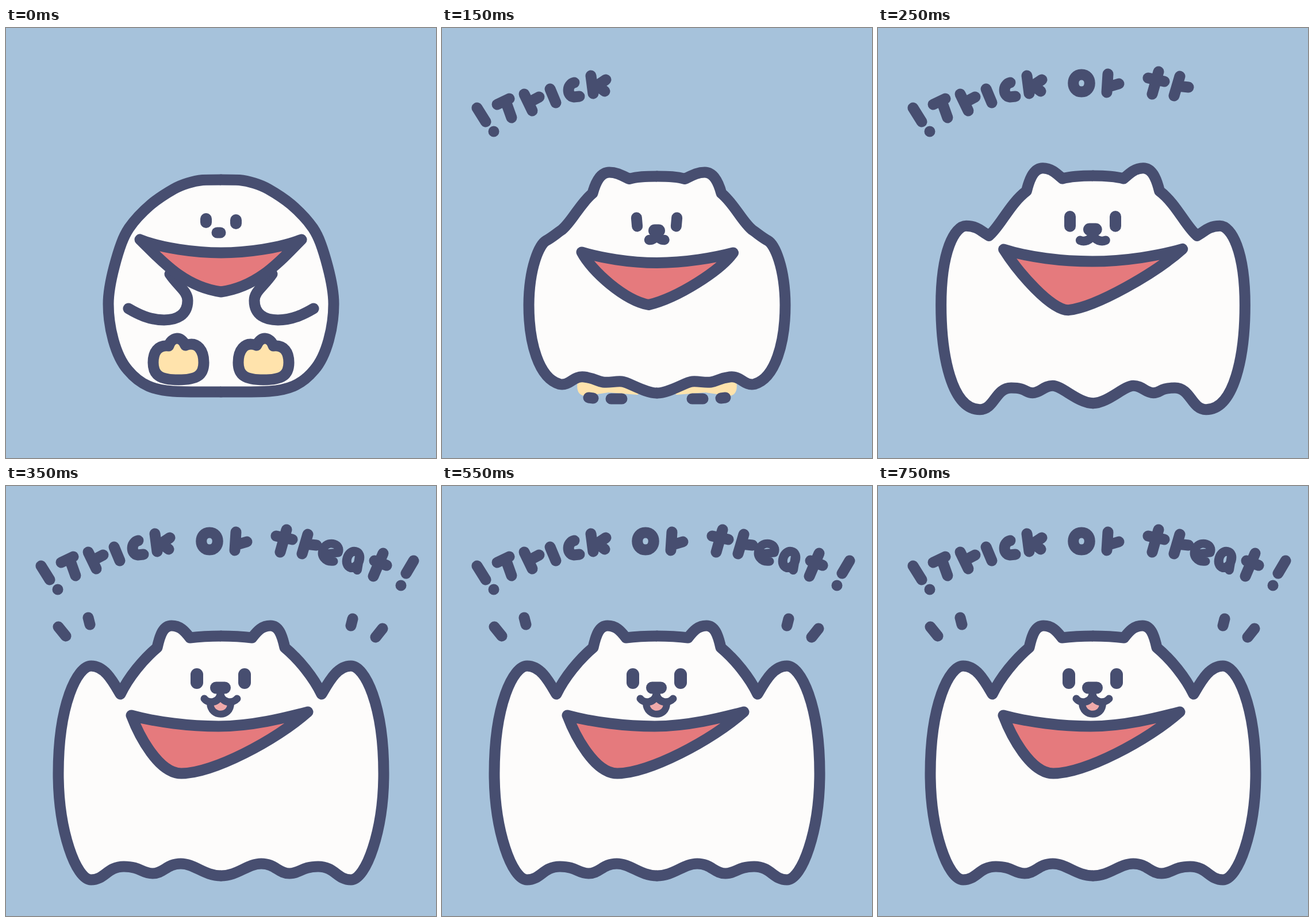
Recreate the animation shown at these times as an HTML page. Size 748 by 748 pixels, loop 0.85 s.

```html
<!DOCTYPE html>
<html lang="en">
<head>
<meta charset="utf-8">
<title>Trick or treat</title>
<style>
html, body { margin: 0; width: 100%; height: 100%; overflow: hidden; background: #a6c2db; }
svg { display: block; width: 748px; height: 748px; }
.ink { stroke: #474e70; stroke-width: 19; stroke-linecap: round; stroke-linejoin: round; fill: none; }
.solid { fill: #474e70; }
.white { fill: #fdfcfb; }
.red { fill: #e57a7d; }
.foot { fill: #ffe3ac; }
</style>
</head>
<body>
<svg viewBox="0 0 748 748">
  <g id="backFeet">
    <g id="backFoot">
      <path class="foot" d="M236 615Q232 638 248 640L290 634L340 638Q346 634 343 628L300 600Z"/>
      <path class="ink" d="M255 643L263 644M294 645L313 645"/>
    </g>
    <use href="#backFoot" transform="matrix(-1 0 0 1 748 0)"/>
  </g>
  <g>
    <path id="body" class="ink white"/>
    <use href="#body" transform="matrix(-1 0 0 1 748 0)"/>
  </g>
  <g id="limbs">
    <g id="limb">
      <path id="arm" class="ink"/>
      <path id="foot" class="ink foot"/>
    </g>
    <use href="#limb" transform="matrix(-1 0 0 1 748 0)"/>
  </g>
  <path id="mouth" class="ink red"/>
  <path id="chin" class="ink" style="fill:#f0a9a9;stroke-width:12"/>
  <path id="lip" class="ink"/>
  <rect id="nose" class="solid"/>
  <rect id="eyeL" class="solid"/>
  <rect id="eyeR" class="solid"/>
  <g id="text" class="ink"></g>
  <path id="marks" class="ink" d="M91 245L104 261M143 229L146 241M603 231L600 243M655 248L643 263"/>
</svg>
<script>
const $ = id => document.getElementById(id);

// body: left half outline; eyes: lx ly rx ry w h tilt; nose: cx cy w h
const round = {
  body: 'M374 264C362 264 352 264 342 264.5C326 266 306 272 292 280S264 297 252 307C238 319 223 335 214 348C208 357 204 366 201 374S178 440 178 480C178 520 190 570 212 595C222 607 234 617 248 623S275 631 290 632S320 633 335 633S360 633 374 633',
  mouth: 'M233 368C270 383 330 391 374 391C418 391 477 383 514 368C480 402 440 450 374 459C308 450 268 402 233 368Z',
  lip: 'M366 357C367 357 369 356 370 356C371 355 373 355 374 355', lipWidth: '15',
  eyes: '348 335 400 337 20 26 0', nose: '370 356 25 19',
  arm: 'M285 428C300 450 316 458 316 474C316 500 296 508 275 508C250 508 230 498 213 488',
  foot: 'M300 612C268 612 256 604 256 582C256 564 264 551 283 553C288 538 304 534 312 552C334 544 344 562 344 582C344 604 332 612 300 612Z'
};
const eared = {
  body: 'M374 261C356 261 344 261 330 264C318 261 308 258 296 258S274 269 268 290C254 305 240 322 227 341C217 355 211 367 206 380S184 440 183 490C183 540 205 565 217 586C228 593 238 601 250 606S272 614 284 617S310 623 322 625S355 630 374 630',
  mouth: 'M267 402C290 406 330 417 374 417C418 417 458 406 481 402C478 426 432 460 374 477C316 460 270 426 267 402Z',
  lip: 'M366 368C368 369 372 366 373 360C374 366 378 369 381 368', lipWidth: '18',
  eyes: '343 338 404 338 19 31 10', nose: '373.5 355 27 22',
  arm: 'M270 405C271 430 270 455 264 475C256 495 246 511 231 511C213 511 201 487 200 463',
  foot: 'M305 622C285 620 268 615 253 606C249 580 256 556 288 570C296 559 312 559 320 570C338 572 352 590 350 601C345 613 332 622 305 622Z'
};
const wide = {
  body: 'M374 255C350 255 336 256 321 261C310 253 300 244 286 244S263 258 256 285C225 307 212 352 190 361C178 362 174 360 156 360S119 392 119 473C119 554 131 653 192 653C218 653 218 608 245 608S265 615 276 615S292 605 304 605S350 640 374 640',
  mouth: 'M219 378C262 393 320 400 374 400C430 400 490 393 532 380C490 418 390 478 345 486C320 488 250 420 219 378Z',
  lip: 'M355 369C362 369 370 366 374 357C378 366 386 369 393 369', lipWidth: '17',
  eyes: '335 337 412 337 19 37 0', nose: '373.5 350 31 22'
};
const raised = {
  body: 'M374 261C354 261 336 262 320 264C310 251 302 243 288 243S268 258 263 281C238 302 213 333 199 362C186 340 172 313 148 313S91 380 91 500C91 600 122 685 148 685C172 685 176 662 205 662S236 674 255 674S280 657 304 657S345 678 374 678',
  mouth: 'M218 399C262 411 320 418 370 418C430 418 490 402 525 393C470 442 360 500 305 500C266 500 232 436 218 399Z',
  lip: 'M345 370C352 379 370 378 373 362C376 378 394 379 402 370', lipWidth: '13',
  eyes: '332 335 415 335 22 36 0', nose: '373 351 36 21',
  chin: 'M355 378L373 369L391 378C391 403 356 403 355 378Z'
};
const hop = {
  body: 'M374 228C354 228 336 229 319 231C309 217 301 207 288 207S268 223 261 246C239 269 215 303 204 330C190 308 178 278 153 278S104 342 104 460C104 510 138 642 172 642C192 642 196 622 222 622S250 636 268 636S290 621 313 621S348 642 374 642',
  mouth: 'M223 368C266 380 320 386 368 386C424 386 485 374 519 363C468 412 362 468 308 468C270 468 236 406 223 368Z',
  lip: 'M344 338C351 347 369 346 372 330C375 346 392 347 399 338', lipWidth: '13',
  eyes: '332 304 412 304 21 35 0', nose: '372 318 35 20',
  chin: 'M354 346L372 337L390 346C390 371 355 371 354 346Z'
};
const poses = [round, eared, wide, raised, hop];
const HOP = 4, RAISED = 3;

// pose position at each step
const steps = [0, .5, 1, 1.5, 2, 7 / 3, 8 / 3, RAISED, HOP, RAISED, HOP, RAISED];

// strokes of each letter, with an optional line width
const letters = [
  ['M61 139L76 163M90 180h.01'],
  ['M96 133L117 123M111 128L121 156'],
  ['M143 115L157 144M152 129L169 120'],
  ['M188 106L198 130'],
  ['M230 95C217 98 217 118 229 120L239 119'],
  ['M259 83L263 114M285 90L270 100L283 110'],
  ['M354 81C373 81 373 111 354 111C335 111 335 81 354 81Z'],
  ['M400 80L398 112M402 102L419 97'],
  ['M488 76L477 115M470 87L498 93'],
  ['M525 84L515 118M522 101L540 103'],
  ['M555 118L578 116C584 101 562 94 553 107C545 122 556 133 570 131', 15],
  ['M608 114C622 117 614 144 600 142C586 138 594 111 608 114ZM615 122L611 146', 16],
  ['M656 117L639 157M641 130L662 138'],
  ['M709 130L696 152M687 173h.01']
];
const glyphs = letters.map(([d, width = 19]) => {
  const p = document.createElementNS('http://www.w3.org/2000/svg', 'path');
  p.setAttribute('d', d);
  p.setAttribute('stroke-width', width);
  $('text').append(p);
  return p;
});

function set(id, attrs) {
  for (const k in attrs) $(id).setAttribute(k, attrs[k]);
}
function show(id, on) {
  $(id).style.display = on ? '' : 'none';
}
// blends the numbers of two strings with the same structure
function mix(a, b, f) {
  const nums = b.match(/[\d.]+/g);
  let i = 0;
  return a.replace(/[\d.]+/g, n => +(+n + (nums[i++] - n) * f).toFixed(2));
}
function pill(id, x, y, w, h, tilt = 0) {
  set(id, { x: x - w / 2, y: y - h / 2, width: w, height: h,
    rx: Math.min(w, h) / 2, transform: `rotate(${tilt} ${x} ${y})` });
}

function draw(ms) {
  const t = ms % 850;
  const step = t < 350 ? Math.floor(t / 50) : 7 + Math.floor((t - 350) / 100);
  const pos = steps[step], i = Math.floor(pos), f = pos - i;
  const a = poses[i], b = poses[Math.min(i + 1, HOP)];
  const get = key => f ? mix(a[key], b[key], f) : a[key];

  set('body', { d: get('body') });
  set('mouth', { d: get('mouth') });
  set('lip', { d: get('lip') });
  $('lip').style.strokeWidth = get('lipWidth');
  const [lx, ly, rx, ry, w, h, tilt] = get('eyes').split(' ').map(Number);
  pill('eyeL', lx, ly, w, h, -tilt);
  pill('eyeR', rx, ry, w, h, tilt);
  pill('nose', ...get('nose').split(' ').map(Number));

  const limbs = pos <= 1;
  show('limbs', limbs);
  if (limbs) {
    set('arm', { d: get('arm') });
    set('foot', { d: get('foot') });
  }
  show('backFeet', pos > 1 && pos <= 2);
  show('chin', pos >= RAISED);
  if (pos >= RAISED) set('chin', { d: a.chin });
  show('marks', pos === RAISED);

  const count = pos === HOP ? 0 : step * 2;
  glyphs.forEach((g, n) => g.style.display = n < count ? '' : 'none');
}

const start = performance.now();
function tick() {
  draw(performance.now() - start);
  requestAnimationFrame(tick);
}
tick();
</script>
</body>
</html>
```
